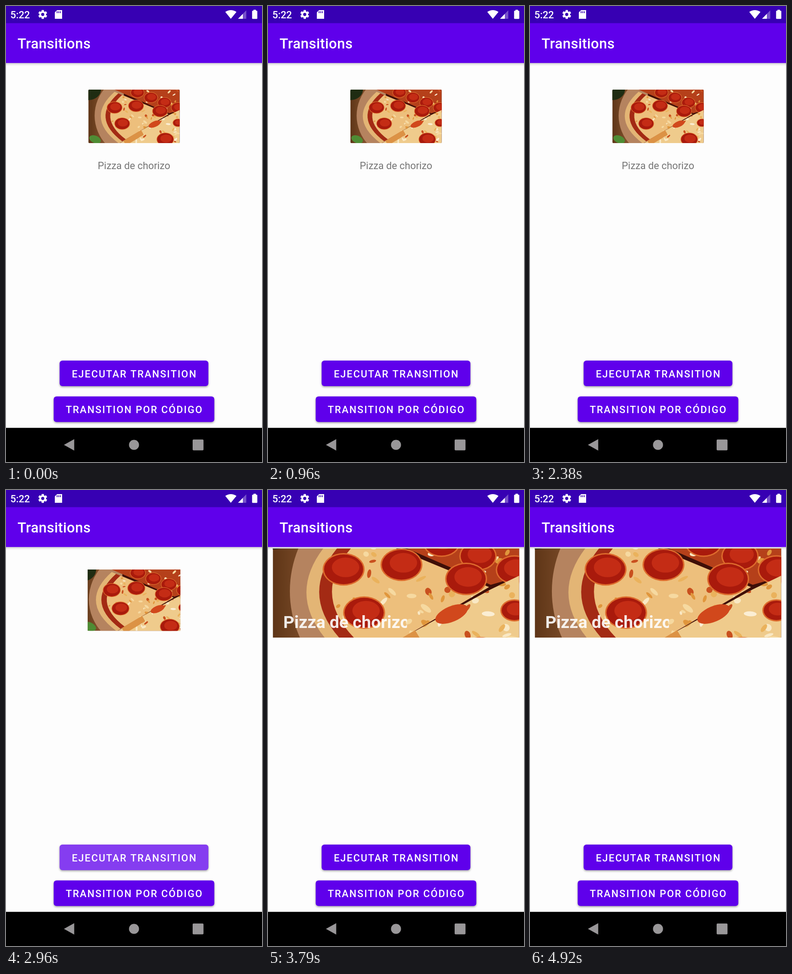
Animation of 561x998 px, one loop 4.96 s. Source, as an HTML page with a canvas:

```html
<!DOCTYPE html>
<html lang="es">
<head>
<meta charset="utf-8">
<title>Transitions</title>
<style>
html, body { margin: 0; width: 100%; height: 100%; overflow: hidden; background: #fdfdfd; }
canvas { display: block; width: 561px; height: 998px; }
</style>
</head>
<body>
<canvas id="stage" width="561" height="998"></canvas>
<script>
const ctx = document.getElementById('stage').getContext('2d');
const W = 561, H = 998, MID = W / 2, DP = W / 360;
const LOOP = 4960, TICK = 1000 / 24;
const TAP = 2785, MOVE_START = 2927, MOVE_TIME = 512, RIPPLE_END = 3230;
const PURPLE = '#5f00eb', DARK_PURPLE = '#3700b3', GREY = '#999799', PAGE = '#fdfdfd';
const PHOTO = { w: 541, h: 316 };

const clamp = v => Math.max(0, Math.min(1, v));
const ease = v => (1 - Math.cos(Math.PI * clamp(v))) / 2;
const lerp = (a, b, p) => a + (b - a) * p;

function fill(color, path) {
  ctx.fillStyle = color;
  ctx.fill(path);
}

function box(x, y, w, h, r = 0) {
  const path = new Path2D();
  path.roundRect(x, y, w, h, r);
  return path;
}

function oval(x, y, rx, ry = rx, turn = 0) {
  const path = new Path2D();
  path.ellipse(x, y, rx, ry, turn, 0, 7);
  return path;
}

function clipped(path, paint) {
  ctx.save();
  ctx.clip(path);
  paint();
  ctx.restore();
}

function shadowed(alpha, blur, paint) {
  ctx.save();
  ctx.shadowColor = `rgba(0,0,0,${alpha})`;
  ctx.shadowBlur = blur;
  ctx.shadowOffsetY = 2;
  paint();
  ctx.restore();
}

function text(str, x, y, sp, { weight = 500, color = '#fff', align = 'left', spacing = 0 } = {}) {
  ctx.font = `${weight} ${sp * DP}px Roboto, sans-serif`;
  ctx.textAlign = align;
  ctx.letterSpacing = spacing + 'px';
  ctx.fillStyle = color;
  ctx.fillText(str, x, y);
}

function seeded(seed) {
  return () => (seed = (seed * 16807) % 2147483647) / 2147483647;
}

// Photo space: 541 x 316, origin at its centre.
function pepperoni(x, y, r) {
  fill('#dd6a2c', oval(x, y, r + 3, r * 0.76 + 3));
  fill('#a91a0c', oval(x, y, r, r * 0.76));
  fill('#c42c15', oval(x + r * 0.1, y - r * 0.1, r * 0.7, r * 0.5));
}

function cheese(area, seed, count) {
  const colors = ['#f9e8c4', '#e0963c', '#f6d9a0', '#c9501e', '#fbeed4', '#eab25c'];
  const rnd = seeded(seed);
  clipped(area, () => {
    for (let i = 0; i < count; i++) {
      const x = (rnd() - 0.5) * PHOTO.w, y = (rnd() - 0.5) * PHOTO.h;
      fill(colors[i % colors.length], oval(x, y, 4 + rnd() * 12, 3 + rnd() * 5, rnd() * 3));
    }
  });
}

function pizza() {
  const right = PHOTO.w / 2, bottom = PHOTO.h / 2;
  const wood = ctx.createLinearGradient(-right, 0, -right + 110, 0);
  wood.addColorStop(0, '#5e3517');
  wood.addColorStop(1, '#8a5731');
  fill(wood, box(-right, -bottom, PHOTO.w, PHOTO.h));
  fill('#1f2c12', oval(-right, -bottom, 75, 62));
  fill('#4f8c34', oval(-right + 40, bottom - 22, 36, 22, 0.4));
  fill('#b5835f', oval(12, -4, 245));

  const back = new Path2D(`M-115 ${-bottom}H${right}V-36L208 -18Z`);
  const front = new Path2D(`M${right} -38L208 -8L30 90L-80 ${bottom}H${right}Z`);
  const slice = new Path2D('M204 -13L-115 -145Q-290 10 -90 160Z');

  fill('#3f0f08', box(-60, -bottom, right + 60, PHOTO.h));
  fill('#b5401a', back);
  cheese(back, 91, 70);
  for (let i = 0; i < 4; i++) pepperoni(20 + i * 80, -141 + i * 30, 38);

  // Crust, sauce and cheese are one wedge shrinking towards its tip.
  ['#e3b575', '#a32a14', '#edbf7c'].forEach((color, i) => {
    ctx.save();
    ctx.translate(204, -13);
    ctx.scale(1 - i * 0.07, 1 - i * 0.07);
    ctx.translate(-204, 13);
    fill(color, slice);
    if (i == 2) cheese(slice, 17, 110);
    ctx.restore();
  });
  [[-115, -52], [12, -62], [-70, 43], [154, -31]].forEach(([x, y]) => pepperoni(x, y, 43));

  fill('#efcb8c', front);
  cheese(front, 53, 110);
  ctx.strokeStyle = '#dc9245';
  ctx.lineWidth = 32;
  ctx.stroke(new Path2D(`M50 95L-55 ${bottom}`));
  fill('#d1481c', oval(122, 46, 38, 17, -0.4));
  pepperoni(260, 38, 28);
  pepperoni(185, 136, 48);
}

function photo(left, top, right, bottom, radius = 0) {
  const w = right - left, h = bottom - top;
  const scale = Math.max(w / PHOTO.w, h / PHOTO.h);
  clipped(box(left, top, w, h, radius), () => {
    ctx.translate(left + w / 2, top + h / 2);
    ctx.scale(scale, scale);
    pizza();
  });
}

function content(t) {
  const label = 'Pizza de chorizo';
  if (t < MOVE_START) {
    photo(MID - 100, 183, MID + 100, 300, 2);
    text(label, MID, 357, 14, { weight: 400, color: '#767676', align: 'center' });
    return;
  }
  const p = ease((t - MOVE_START) / MOVE_TIME);
  const half = lerp(100, 270, p);
  photo(MID - half, lerp(174.5, 128, p), MID + half, lerp(308, 323, p));

  const left = lerp(201, 33.5, p), top = lerp(336, 266, p);
  clipped(box(left, top, lerp(159, 271, p), lerp(29, 45, p)), () =>
    text(label, left, top + 36, 24, { weight: 700, color: 'rgba(253,253,253,.9)' }));
}

function ripple(y, t) {
  if (t < TAP || t > RIPPLE_END) return;
  const alpha = 0.24 * clamp((t - TAP) / 75) * clamp((RIPPLE_END - t) / 260);
  fill(`rgba(255,255,255,${alpha})`, oval(MID, y, lerp(60, 185, ease((t - TAP) / 160))));
}

function button(label, y, w, t) {
  const shape = box(MID - w / 2, y, w, 56, 4 * DP);
  shadowed(0.36, 4, () => fill(PURPLE, shape));
  clipped(shape, () => ripple(y + 28, t));
  text(label, MID + 0.9, y + 36.5, 14, { align: 'center', spacing: 2 });
}

function gear(x, y) {
  ctx.save();
  ctx.translate(x, y);
  for (let i = 0; i < 6; i++) {
    ctx.rotate(Math.PI / 3);
    fill('#fff', box(-2.6, -9.8, 5.2, 7, 1));
  }
  fill('#fff', oval(0, 0, 7.3));
  fill(DARK_PURPLE, oval(0, 0, 3.4));
  ctx.restore();
}

function statusBar() {
  fill(DARK_PURPLE, box(0, 0, W, 24 * DP));
  text('5:22', 9.5, 27, 14);
  gear(80.5, 18.5);
  fill('#fff', new Path2D('M112 9H123V28H107V14Z'));
  for (let i = 0; i < 3; i++) fill(DARK_PURPLE, box(111 + i * 3.5, 11.5, 1.8, 4));
  fill('#fff', new Path2D('M492.7 28L480.5 13Q492.7 4.8 505 13Z'));
  fill('rgba(255,255,255,.32)', new Path2D('M508.5 28L526.5 9.5V28Z'));
  fill('#fff', new Path2D('M508.5 28L519 17.2V28Z'));
  fill('#fff', box(539.3, 10.3, 11.4, 18, 1.5));
  fill('#fff', box(542.3, 8.2, 5.4, 3));
}

function appBar() {
  shadowed(0.22, 5, () => fill(PURPLE, box(-10, 20, W + 20, 80 * DP - 20)));
  statusBar();
  text('Transitions', 25.2, 93, 20, { spacing: 0.39 });
}

function navBar() {
  fill('#000', box(0, H - 48 * DP, W, 48 * DP));
  fill(GREY, new Path2D('M127 960.5L149.5 948V973Z'));
  fill(GREY, oval(MID, 960.5, 11));
  fill(GREY, box(409, 948.8, 23.8, 23.8, 2));
}

function draw(now) {
  const t = Math.floor((now % LOOP + 8) / TICK) * TICK;
  fill(PAGE, box(0, 0, W, H));
  appBar();
  content(t);
  button('EJECUTAR TRANSITION', 776, 326, t);
  button('TRANSITION POR CÓDIGO', 854.5, 352, 0);
  navBar();
}

const began = performance.now();
function loop() {
  draw(performance.now() - began);
  requestAnimationFrame(loop);
}
loop();
</script>
</body>
</html>
```
